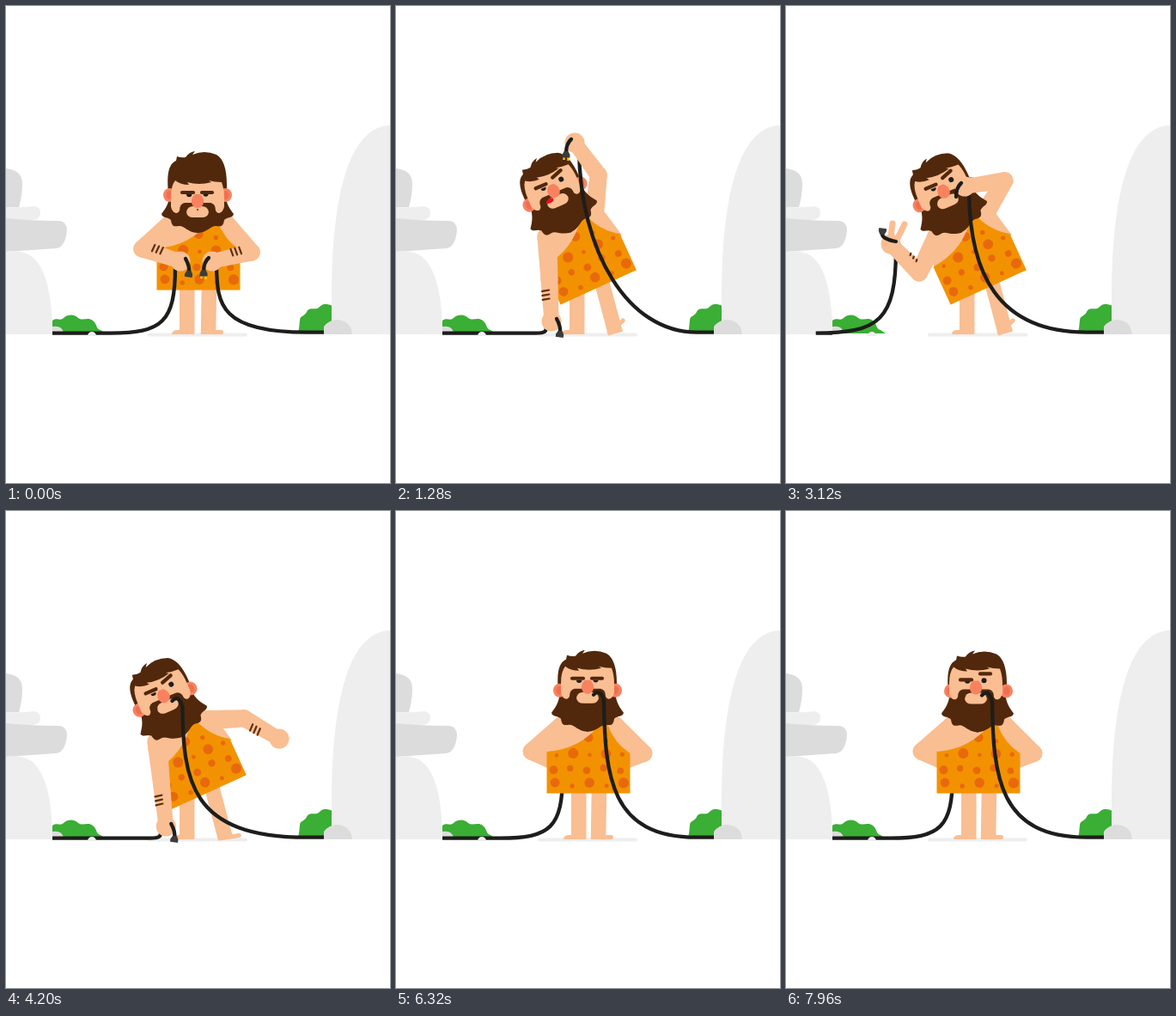
Write an HTML page with a canvas that moves like this. It is 447x555 px and loops after 8000 ms.

```html
<!DOCTYPE html>
<html lang="en">
<head>
<meta charset="utf-8">
<title>Caveman and cable</title>
<style>
html, body { margin: 0; width: 100%; height: 100%; overflow: hidden; background: #fff; }
canvas { display: block; width: 447px; height: 555px; }
</style>
</head>
<body>
<canvas></canvas>
<script>
const LOOP = 8000, BONE = 47, GROUND = 380, WALL = 371;
const SKIN = '#f9be92', HAIR = '#51280b', RED = '#f8825f', ORANGE = '#f39200', SPOT = '#e8690b';
const PALE = '#eeeeee', GREY = '#dcdcdc', GREEN = '#3aae35', CABLE = '#1d1d1b';
const canvas = document.querySelector('canvas');
const g = canvas.getContext('2d');
const dpr = window.devicePixelRatio || 1;
canvas.width = 447 * dpr;
canvas.height = 555 * dpr;

// Motion helpers
const clamp = v => Math.max(0, Math.min(1, v));
const ramp = (t, from, to) => {
  const p = clamp((t - from) / (to - from));
  return p * p * (3 - 2 * p);
};
const wave = (t, period) => 0.5 + 0.5 * Math.cos(2 * Math.PI * (t - 1280) / period);
const mix = (a, b, p) => a.map((v, i) => v + (b[i] - v) * p);
const add = ([x, y], dx, dy) => [x + dx, y + dy];
const rotate = ([x, y], degrees) => {
  const a = degrees * Math.PI / 180, c = Math.cos(a), s = Math.sin(a);
  return [x * c - y * s, x * s + y * c];
};
// A route is a list of moves: start time, end time, place reached [x, y, bend of the elbow].
const follow = (origin, moves, t) => moves.reduce((at, [from, to, place]) => mix(at, place, ramp(t, from, to)), origin);

const LOW = [181, 367, 1];
const leftRoute = [[240, 720, LOW], [2300, 2760, [122, 277, -1]], [3360, 3800, LOW], [5880, 6240, [200, 300, 1]]];
const rightRoute = [[240, 760, [208, 159, 1]], [1420, 1680, [208, 210, 1]], [3400, 3720, [255, 165, 1]],
  [3720, 4140, [318, 265, -1]], [4220, 4560, [232, 288, -1]], [5880, 6200, [245, 300, -1]]];

function elbowOf([sx, sy], [hx, hy, bend]) {
  const dx = hx - sx, dy = hy - sy, d = Math.hypot(dx, dy);
  const out = bend * Math.sqrt(Math.max(0, BONE * BONE - d * d / 4)) / d;
  return [(sx + hx) / 2 - dy * out, (sy + hy) / 2 + dx * out];
}

// Drawing helpers
const fill = (d, color) => { g.fillStyle = color; g.fill(new Path2D(d)); };
function stroke(d, color, width, cap = 'round') {
  g.strokeStyle = color;
  g.lineWidth = width;
  g.lineCap = cap;
  g.stroke(new Path2D(d));
}
function oval(x, y, rx, ry, color) {
  g.fillStyle = color;
  g.beginPath();
  g.ellipse(x, y, rx, ry, 0, 0, 2 * Math.PI);
  g.fill();
}
const dot = (x, y, r, color) => oval(x, y, r, r, color);
function placed([x, y], degrees, draw) {
  g.save();
  g.translate(x, y);
  g.rotate(degrees * Math.PI / 180);
  draw();
  g.restore();
}
const angleOf = ([x0, y0], [x1, y1]) => Math.atan2(y1 - y0, x1 - x0) * 180 / Math.PI;
function limb(a, ra, b, rb) {
  const len = Math.hypot(b[0] - a[0], b[1] - a[1]);
  placed(a, angleOf(a, b), () => {
    fill(`M0,${-ra}L${len},${-rb}V${rb}L0,${ra}Z`, SKIN);
    dot(0, 0, ra, SKIN);
    dot(len, 0, rb, SKIN);
  });
}

// Scenery
function drawBehind() {
  fill('M54,366C60,362 63,367 67,363C73,358 80,359 84,363C90,367 95,361 101,366C107,371 104,375 110,377L116,381H54Z', GREEN);
  fill('M338,381C342,378 341,372 342,366C342,360 348,361 350,356C353,349 361,355 365,350C370,345 375,347 380,349V381Z', GREEN);
  fill('M54,373Q65,371 67,380H54Z', GREY);
  fill('M0,189Q19,191 19,207Q19,220 15,234H0Z', GREY);
  fill('M0,234Q18,235 33,233Q40,234 40,241Q39,249 30,249H0Z', PALE);
  fill('M0,247Q30,250 62,250Q71,251 71,261Q69,281 58,282L0,286Z', GREY);
  fill('M0,286Q12,283 24,288C43,296 54,328 54,382H0Z', PALE);
  fill('M379,382V330C380,215 401,140 447,139V382Z', PALE);
  stroke('M167,382.5H279', PALE, 4);
}
function drawBefore() {
  fill('M95,384A5,5 0 0 1 105,384Z', PALE);
  fill('M370,382V373Q376,365 386,365Q402,367 403,382Z', GREY);
}

// Character
function drawLegs(lean, look, hem, t) {
  const x = 204 - 2 * Math.max(lean, look);
  fill(`M${x},${hem - 12}h17.5V382H${x - 9}Q${x - 9},377 ${x - 2},377H${x}Z`, SKIN);
  stroke(`M${236.5 + 2.5 * lean},${hem - 8}L${235.5 + 20 * lean},${382 - lean}`, SKIN, 17.5, 'butt');
  const tap = -42 * lean * wave(t, 460);
  placed([227 + 21.5 * lean, 382 + 1.5 * lean], tap, () => {
    fill('M0,0V-5H24V0Z', SKIN);
    dot(23.5, -2.5, 2.5, SKIN);
  });
}

function drawBody() {
  fill('M-48,-44L-43,-76L-32,-84Q0,-98 32,-84L43,-76L50,-44Z', SKIN);
  g.save();
  const tunic = new Path2D('M-48.5,0.5V-48Q-8,-51 15,-82L22,-80Q30,-58 48.5,-46V0.5Z');
  g.fillStyle = ORANGE;
  g.fill(tunic);
  g.clip(tunic);
  for (let row = 0; row < 4; row++) {
    for (let col = 0; col < 5; col++) {
      const turn = row * 2 + col * 3.3;
      dot(-39 + 19.5 * col + 2 * Math.sin(turn * 2), -10 - 17.5 * row - 2 * Math.cos(turn),
        4.2 + 1.9 * Math.sin(turn + 0.7), SPOT);
    }
  }
  g.restore();
}

function drawHead(at, angle, { lean, look, wink }, tongue) {
  const turn = -2 * wink, open = Math.max(lean, wink);
  placed(at, angle, () => {
    g.save();
    g.translate(0, -4 * look);
    fill('M-34,2C-36,-20 -34,-32 -25,-36L-24,-41Q-18,-39 -14,-40Q-10,-46 -3,-47L-6,-43Q8,-49 22,-43' +
      'Q34,-36 34,-8V2Z', HAIR);
    for (const side of [1, -1]) {
      g.scale(side, 1);
      fill('M-1,-4H32C32,12 36,18 42,26C41,31 35,29 31,33C30,40 28,41 22,40C15,39 13,47 0,48H-1Z', HAIR);
    }
    g.restore();
    for (const side of [-1, 1]) {
      oval(side * 32.5 - turn * .5, 0, 7.5, 8, RED);
      oval(side * 33 - turn * .5, 0, 3.5, 5, '#ee6f51');
    }
    g.translate(turn, 11 * look);
    fill('M-31,-8Q-31,-22 -26,-28Q-20,-23 -10,-23L-12,-26Q2,-22 16,-26L13,-28Q20,-26 28,-26Q31,-18 31,-8' +
      'V2C30,9 24,13 21,7Q21,-1 15,-2H-15Q-21,-1 -21,7C-24,13 -30,9 -31,2Z', SKIN);
    fill('M-13,9Q-12,2 -5,2H5Q12,2 13,9Q12,15 5,15H-5Q-12,15 -13,9Z', SKIN);
    if (tongue) fill('M-14,6Q-10,0 -4,3L-4,6Q-9,9 -14,6Z', '#e5131d');
    if (look > 0.5) dot(0, 6, 1, HAIR);
    fill('M-13,-12A3.2,3.2 0 0 0 -6.6,-12Z', CABLE);
    g.save();
    g.beginPath();
    g.rect(4, -12 - 6 * open, 16, 14);
    g.clip();
    dot(9.5 + 4 * lean, -12.2 - lean, 3, CABLE);
    g.restore();
    const browL = -14 - lean + wink, browR = -14 - 7 * lean - 6 * wink;
    stroke(`M-18,${browL}H-5`, HAIR, 4.2);
    stroke(`M5,${browR + 2 * lean}L17,${browR - 2 * lean}`, HAIR, 4.2);
    fill('M-3,-12H3Q7.5,-8 7,-3A7,7 0 0 1 -7,-3Q-7.5,-8 -3,-12Z', RED);
  });
}

function drawForearm(elbow, hand, bandSide, bandLength) {
  limb(elbow, 10, hand, 8.5);
  dot(hand[0], hand[1], 11.5, SKIN);
  if (!bandLength) return;
  const at = mix(elbow, hand, .36);
  placed(at, angleOf(elbow, hand), () => {
    for (const k of [-5, 0, 5]) {
      stroke(`M${k},${bandSide * (9 - bandLength)}L${k + 1},${bandSide * 9}`, '#5f300f', 2.2);
    }
  });
}
function drawFingers([x, y], raised) {
  stroke(`M${x - 1},${y}l3,${-24 * raised}M${x + 6},${y - 3}l${10 * raised},${-20 * raised}`, SKIN, 7);
}

function drawLeftCable([x, y]) {
  const h = GROUND - y;
  stroke(`M${x},${y}C${x},${y + .85 * h} ${x - .2 * h},380.6 ${x - .9 * h - 6},380.6H54`, CABLE, 4.3, 'butt');
}
function drawRightCable([x, y], held) {
  const h = GROUND - y;
  const pull = 8 + held * (Math.max(4, .5 * h - 50) - 8);
  stroke(`M${x},${y}C${x + 1},${y + .56 * h} ${x + pull},379.7 350,379.7H${WALL}`, CABLE, 4.3, 'butt');
}
function drawTip(from, bend, end, plug, prongs) {
  stroke(`M${from}Q${bend} ${end}`, CABLE, 4.3);
  if (!plug) return;
  placed(end, angleOf(bend, end), () => {
    if (prongs) stroke('M4,-2.5H9M4,2.5H8', '#fccc0a', 2.4, 'butt');
    fill('M-2,-2.5L2,-4.5H5.5V4.5H2L-2,2.5Z', '#3c3c3b');
  });
}

function draw(t) {
  const lean = ramp(t, 240, 640) - ramp(t, 5880, 6200);
  const look = 1 - ramp(t, 240, 640);
  const wink = ramp(t, 7280, 7520);
  const held = 1 - ramp(t, 3400, 3560);
  const chew = 0.5 * Math.sin(t / 95) * ramp(t, 1420, 1700);

  const hem = 328 - lean + 2 * look, hip = [224 + 11.5 * lean, hem], tilt = -24.5 * lean;
  const headAt = [223 - 38 * lean, 209 + 10 * lean + 11 * look + chew], headTilt = -23 * lean;
  const shoulder = side => add(rotate([30 * side, -78], tilt), ...hip);
  const bite = add(rotate([7 + 2 * turnOf(wink), 5], headTilt), ...headAt);

  const left = follow([203, 297, 1], leftRoute, t);
  left[0] += 6 * (1 - wave(t, 808)) * clamp((left[1] - 340) / 25);
  const right = follow([240, 297, -1], rightRoute, t);
  const leftElbow = elbowOf(shoulder(-1), left), rightElbow = elbowOf(shoulder(1), right);
  const bend = left[2], raised = clamp(-bend);
  const leftBack = raised > 0 || t > 6040, rightBack = t > 3700;

  const leftArm = () => {
    limb(shoulder(-1), 11.5, leftElbow, 10);
    drawLeftCable(add(left, -6 * bend, 6));
    drawForearm(leftElbow, left, 1 - 2 * look, t < 6000 ? 5 + 3 * bend : 0);
    if (raised > 0.3) drawFingers(left, raised);
    drawTip(add(left, 6, -3), add(left, 11 * bend, 6 * bend), add(left, 10 * bend, 13 * bend), true, false);
  };
  const rightForearm = () => drawForearm(rightElbow, right, 1, t < 500 || (rightBack && t < 4450) ? 8 : 0);
  const inHandOrMouth = (hx, hy, mx, my) => mix(add(bite, mx, my), add(right, hx, hy), held);

  g.setTransform(dpr, 0, 0, dpr, 0, 0);
  g.fillStyle = '#fff';
  g.fillRect(0, 0, 447, 555);
  drawBehind();
  drawLegs(lean, look, hem, t);
  if (leftBack) leftArm();
  limb(shoulder(1), 11.5, rightElbow, 10);
  if (rightBack) rightForearm();
  placed(hip, tilt, drawBody);
  if (!leftBack) leftArm();
  drawHead(headAt, headTilt, { lean, look, wink }, t > 1080 && t < 1620);
  drawRightCable(inHandOrMouth(5, 7, 12, 6), held);
  if (!rightBack) rightForearm();
  drawTip(inHandOrMouth(-4, -4, 12, 7), inHandOrMouth(-10, 1, 8, -8), inHandOrMouth(-10, 12, 0, 0), t < 1620, true);
  drawBefore();
}
function turnOf(wink) { return -wink; }

const start = performance.now();
function frame() {
  draw((performance.now() - start) % LOOP);
  requestAnimationFrame(frame);
}
frame();
</script>
</body>
</html>
```
